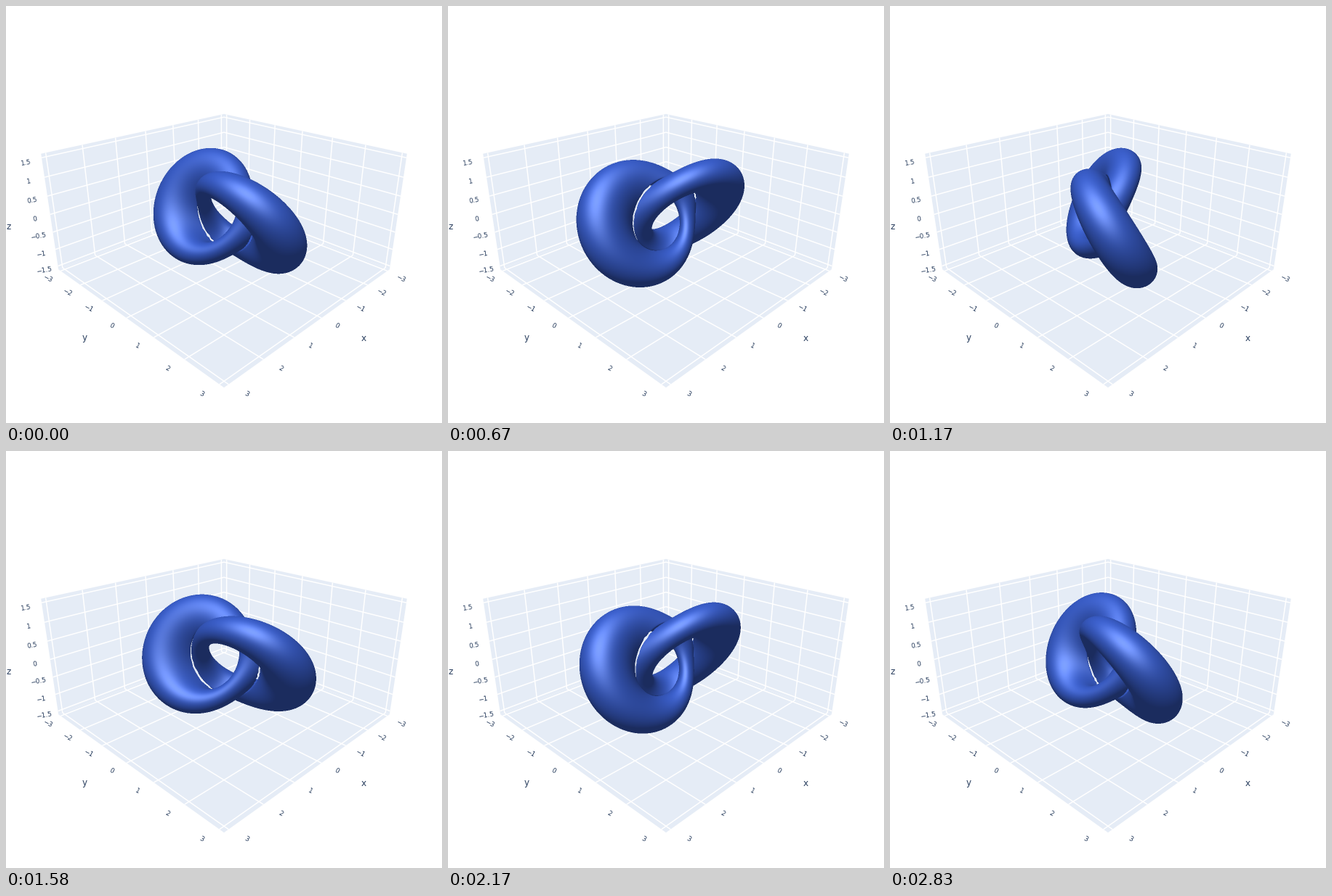
Recreate the animation shown at these times as a matplotlib script. Size 600x575 px, loop 2910 ms.

```python
import numpy as np
import matplotlib.pyplot as plt
from matplotlib.animation import FuncAnimation

W, H, DPI = 600, 575, 100
FRAMES, LOOP_MS = 35, 2910

# Camera: looks at the origin along the diagonal of the box.
# Scene coordinates are (p, q, z): towards the viewer, to the right, up.
ELEV = np.radians(23.6)
SIN, COS = np.sin(ELEV), np.cos(ELEV)
DIST, FOCAL = 12.8, 694.0
CX, CY = 300.0, 287.4
SIDE, TOP = 3.12, 1.6

# Window that holds the link, and its supersampling
X0, X1, Y0, Y1 = 165, 435, 192, 398
SS = 2
STEPS = np.linspace(-2.45, 2.45, 84, dtype=np.float32)
GAP = np.float32(0.004)     # keeps the two rings just apart

BASE = np.array([65, 105, 225]) / 255
LIGHT = np.array([0.4, -0.2, 0.9])
LIGHT /= np.linalg.norm(LIGHT)
INK = "#2a3f5f"


def project(x, y, z):
    p, q = (x + y) / np.sqrt(2), (y - x) / np.sqrt(2)
    depth = DIST - p * COS - z * SIN
    scale = FOCAL / depth
    return CX + q * scale, CY - (z * COS - p * SIN) * scale


def pixel_rays():
    xs = X0 + (np.arange((X1 - X0) * SS) + 0.5) / SS
    ys = Y0 + (np.arange((Y1 - Y0) * SS) + 0.5) / SS
    u, v = np.meshgrid((xs - CX) / FOCAL, (CY - ys) / FOCAL)
    u, v = u.ravel(), v.ravel()
    offset = np.array([-SIN * v, u, COS * v])
    forward = np.array([[-COS], [0], [-SIN]])
    return (DIST * offset).astype(np.float32), (forward + offset).astype(np.float32)


START, RAY = pixel_rays()


def turn(vec, phi):
    """(p, q, z) to the frame of the link: long axis, up, cross axis."""
    c, s = np.float32(np.cos(phi)), np.float32(np.sin(phi))
    return np.array([vec[0] * c + vec[1] * s, vec[2], vec[0] * s - vec[1] * c])


def level(pos):
    """Negative inside the Hopf lift of a lemniscate (Viviani's curve):
    |w2|^4 + Re((w2 conj w1)^2) with w1 = 2(x + iy), w2 = -2m + i(r^2 - 1)."""
    x, y, m = pos
    m = -2 * m
    m2 = m * m
    g = x * x + y * y + m2 / 4 - 1
    u = m * x + g * y
    v = g * x - m * y
    w = m2 + g * g
    return w * w + 4 * (u - v) * (u + v) + GAP


def first_hit(o, d):
    hit = np.full(o.shape[1], np.inf, np.float32)
    alive = np.arange(hit.size)
    for block in np.array_split(STEPS, 7):
        start, ray = o[:, alive], d[:, alive]
        near = hit[alive]
        for t in block:
            near[(level(start + t * ray) < 0) & (near == np.inf)] = t
        hit[alive] = near
        alive = alive[near == np.inf]

    found = np.flatnonzero(hit < np.inf)
    start, ray = o[:, found], d[:, found]
    hi = hit[found]
    lo = hi - (STEPS[1] - STEPS[0])
    for _ in range(9):
        mid = (lo + hi) / 2
        inside = level(start + mid * ray) < 0
        hi = np.where(inside, mid, hi)
        lo = np.where(inside, lo, mid)
    return found, (start + hi * ray).astype(float), ray


def unit(v):
    return v / np.sqrt((v * v).sum(0))


def shade(pos, ray, light):
    steps = 1e-4 * np.eye(3)[:, :, None]
    normal = unit(np.array([level(pos + e) - level(pos - e) for e in steps]))
    half = unit(light[:, None] - unit(ray))
    diffuse = np.clip(light @ normal, 0, 1)
    gloss = np.clip((normal * half).sum(0), 0, 1) ** 12
    rgb = BASE * np.minimum(1, 0.42 + 0.5 * diffuse)[:, None]
    return np.clip(rgb + 0.27 * gloss[:, None], 0, 1)


def render(frame):
    phi = np.radians(45 + 360 * frame / FRAMES)
    found, pos, ray = first_hit(turn(START, phi), turn(RAY, phi))
    rgba = np.zeros((START.shape[1], 4))
    rgba[found, :3] = shade(pos, ray, turn(LIGHT, phi))
    rgba[found, 3] = 1
    rows, cols = Y1 - Y0, X1 - X0
    rgba = rgba.reshape(rows, SS, cols, SS, 4).mean((1, 3))
    rgba[..., :3] /= np.maximum(rgba[..., 3:], 1e-6)
    return np.clip(rgba, 0, 1)


fig = plt.figure(figsize=(W / DPI, H / DPI), dpi=DPI, facecolor="white")
ax = fig.add_axes([0, 0, 1, 1])
ax.axis("off")


def wall(*corners):
    ax.fill(*zip(*(project(*c) for c in corners)), color="#e5ecf6", lw=0)


def grid_line(start, end):
    xs, ys = zip(project(*start), project(*end))
    ax.plot(xs, ys, color="white", lw=1.1, solid_capstyle="butt")


def label(x, y, text, size, angle=0):
    ax.text(x, y, text, fontsize=size * 72 / DPI, rotation=angle, color=INK,
            family="DejaVu Sans", ha="center", va="center")


def number(v):
    return f"{v:g}".replace("-", "\u2212")


def draw_box():
    s, h = SIDE, TOP
    wall((s, s, -h), (s, -s, -h), (-s, -s, -h), (-s, s, -h))
    wall((s, -s, -h), (-s, -s, -h), (-s, -s, h), (s, -s, h))
    wall((-s, s, -h), (-s, -s, -h), (-s, -s, h), (-s, s, h))
    for v in range(-3, 4):
        grid_line((v, s, -h), (v, -s, -h))
        grid_line((v, -s, -h), (v, -s, h))
        grid_line((s, v, -h), (-s, v, -h))
        grid_line((-s, v, -h), (-s, v, h))
    for z in np.arange(-1.5, 1.6, 0.5):
        grid_line((s, -s, z), (-s, -s, z))
        grid_line((-s, s, z), (-s, -s, z))


def draw_labels():
    ticks = [(57, 376), (84, 395), (113, 417), (145, 441),
             (181, 469), (222, 500), (269, 535)]
    for v, (x, y) in enumerate(ticks, -3):
        label(x, y, number(v), 9, -28)
        label(W - x, y, number(v), 9, -28)
    for i, y in enumerate((216, 242, 268, 294, 318, 342, 365)):
        label(27.5 + 4.1 * i, y, number(1.5 - 0.5 * i), 9, 10)
    label(108, 458, "y", 12)
    label(492, 459, "x", 12)
    label(4, 304, "z", 12)


draw_box()
draw_labels()
link = ax.imshow(render(0), extent=(X0, X1, Y1, Y0), interpolation="nearest",
                 aspect="auto", zorder=5)
ax.set_xlim(0, W)
ax.set_ylim(H, 0)


def update(frame):
    link.set_data(render(frame))
    return (link,)


anim = FuncAnimation(fig, update, frames=FRAMES, interval=LOOP_MS / FRAMES,
                     repeat=True, repeat_delay=0)
plt.show()
```
